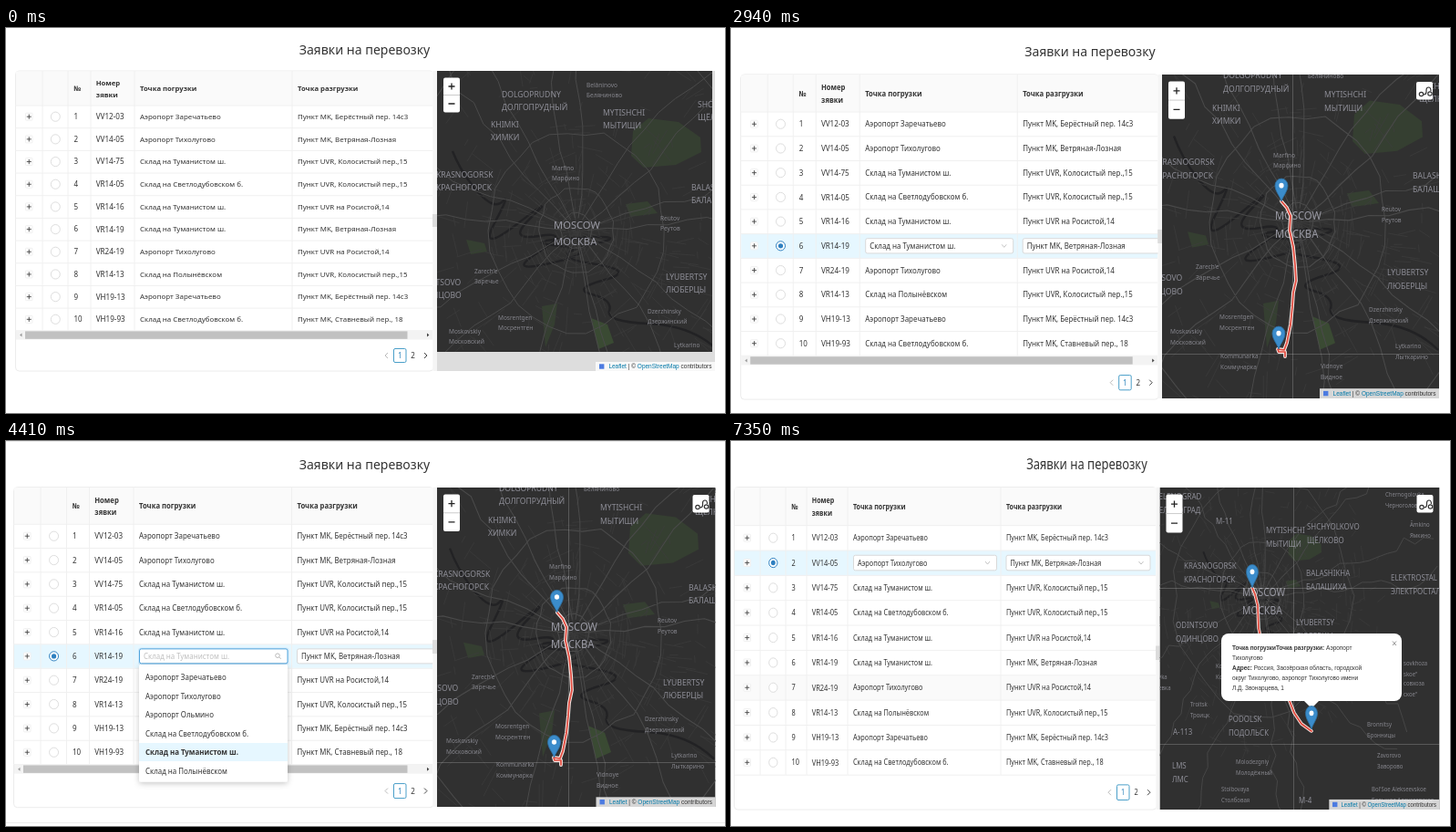
Animation of 789x422 px, one loop 8000 ms. Source, as an HTML page:

```html
<!DOCTYPE html>
<html lang="ru">
<head>
<meta charset="utf-8">
<title>Заявки на перевозку</title>
<style>
html, body { margin: 0; width: 100%; height: 100%; overflow: hidden; background: #fff; }
#stage { position: relative; width: 789px; height: 422px; overflow: hidden; }
#reel { animation: cut 8s step-end infinite; }
#reel > svg { display: block; }
text { font-family: "Noto Sans", "Open Sans", sans-serif; white-space: pre; }
.arial { font-family: "Liberation Sans", Arial, sans-serif; }
@keyframes cut {
  0% { transform: translateY(0); }
  18.375% { transform: translateY(-422px); }
  36.75% { transform: translateY(-844px); }
  55.125% { transform: translateY(-1266px); }
  73.5% { transform: translateY(-1688px); }
  91.875% { transform: translateY(-2110px); }
}
</style>
</head>
<body>
<div id="stage"><div id="reel"></div></div>
<script>
const airports = ['Заречатьево', 'Тихолугово', 'Ольмино'].map(n => 'Аэропорт ' + n);
const depots = ['Светлодубовском б.', 'Туманистом ш.', 'Полынёвском'].map(n => 'Склад на ' + n);
const places = [...airports, ...depots];
const drops = ['Пункт MK, Берёстный пер. 14с3', 'Пункт MK, Ветряная-Лозная',
  'Пункт UVR, Колосистый пер.,15', 'Пункт UVR на Росистой,14', 'Пункт MK, Ставневый пер., 18'];
const orders = [
  ['VV12-03', 0, 0], ['VV14-05', 1, 1], ['VV14-75', 4, 2], ['VR14-05', 3, 2], ['VR14-16', 4, 3],
  ['VR14-19', 4, 1], ['VR24-19', 1, 3], ['VR14-13', 5, 2], ['VH19-13', 0, 0], ['VH19-93', 3, 4]];

// Place labels: x, y, Latin name, Cyrillic name
const cityLabels = [
  [637, 63, 'Belâninovo', 'Беляниново'], [544, 73, 'DOLGOPRUDNY', 'ДОЛГОПРУДНЫЙ'],
  [532, 106, 'KHIMKI', 'ХИМКИ'], [655, 93, 'MYTISHCHI', 'МЫТИЩИ'], [759, 84, 'SHCHYOLKOVO', 'ЩЁЛКОВО'],
  [599, 154, 'Marfino', 'Марфино'], [472, 161, 'KRASNOGORSK', 'КРАСНОГОРСК'],
  [752, 175, 'BALASHIKHA', 'БАЛАШИХА'], [718, 209, 'Reutov', 'Реутов'], [601, 216, 'MOSCOW', 'МОСКВА'],
  [514, 267, "Zarech'e", 'Заречье'], [449, 279, 'ODINTSOVO', 'ОДИНЦОВО'], [724, 273, 'LYUBERTSY', 'ЛЮБЕРЦЫ'],
  [540, 318, 'Mosrentgen', 'Мосрентген'], [704, 311, 'Dzerzhinsky', 'Дзержинский'],
  [486, 333, 'Moskovskiy', 'Московский'], [733, 348, 'Lytkarino', 'Лыткарино'],
  [541, 358, 'Kommunarka', 'Коммунарка'], [651, 368, 'Vidnoye', 'Видное'], [546, 15, 'Lobnya', 'Лобня'],
  [410, 24, 'ZELENOGRAD', 'ЗЕЛЕНОГРАД'], [703, 13, 'PUSHKINO', 'ПУШКИНО'], [415, 148, 'Nakhabino', 'Нахабино']];
const regionLabels = [
  [587, 98, 'MYTISHCHI', 'МЫТИЩИ'], [632, 94, 'SHCHYOLKOVO', 'ЩЁЛКОВО'], [497, 137, 'KRASNOGORSK', 'КРАСНОГОРСК'],
  [561, 166, 'MOSCOW', 'МОСКВА'], [631, 145, 'BALASHIKHA', 'БАЛАШИХА'], [724, 150, 'ELEKTROSTAL', 'ЭЛЕКТРОСТАЛЬ'],
  [620, 199, 'LYUBERTSY', 'ЛЮБЕРЦЫ'], [488, 202, 'ODINTSOVO', 'ОДИНЦОВО'], [718, 58, 'Chernogolovka', 'Черноголовка'],
  [745, 91, 'Âmkino', 'Ямкино'], [465, 61, 'ZELENOGRAD', 'ЗЕЛЕНОГРАД'], [532, 88, 'M-11', ''],
  [504, 288, 'Troitsk', 'Троицк'], [546, 305, 'PODOLSK', 'ПОДОЛЬСК'], [485, 319, 'A-113', ''],
  [698, 310, 'Bronnitsy', 'Бронницы'], [709, 344, 'Zavorovo', 'Заворово'], [484, 356, 'LMS', 'ЛМС'],
  [554, 351, 'Molodezgniy', 'Молодёжный'], [538, 381, 'Stolbovaya', 'Столбовая'], [623, 394, 'M-4', ''],
  [703, 381, "Bol'Soe Alekseevskoe", 'Большое Алексеевское'], [451, 258, 'Aprelevka', 'Апрелевка'],
  [532, 246, 'Kommunarka', 'Коммунарка'], [738, 243, 'sovkhoza', 'skoe"'], [738, 265, 'совхоза', 'ское"']];

const cols = [10.5, 40, 68, 93, 141, 314, 468];
const shift = d => cols.map(x => x + d);
// map: [left, top, right, bottom]; world: [x scale, x shift, y scale, y shift]
const scenes = [
  { ky: 1, ty: 0, cols, mid: 393.5, map: [473, 47, 778, 376], tiles: [775, 355], world: [1, 0, 1, 0] },
  { ky: 1.092, ty: -.9, cols: shift(.4), mid: 394, map: [473, 51, 777, 408.5], world: [1, 39.5, 1.092, 49],
    row: 0, from: 0, pins: [[571.5, 93], [678, 283]],
    route: '572 93 569 96 560 99 552 103 548 108 550 113 556 117 565 114 574 114 580 117 585 127 592 150 598 158 604 170 602 177 606 183 616 192 624 200 632 208 640 220 642 235 645 250 650 257 652 263 658 262 661 271 672 273 678 283' },
  { ky: 1.0827, ty: 0, cols: shift(.2), mid: 394, map: [473, 51, 777, 406], world: [1, -4, 1.08, -27.3],
    row: 5, from: 4, pins: [[604, 190], [601, 352]], seams: 'M616.5 51V406M473 357.5H777',
    route: '604 190 610 197 614 206 613 222 617 240 619 260 620 277 617 290 616 305 614 325 610 345 607 353 600 352 601 355 608 355 608 360' },
  { ky: 1.067, ty: .5, cols: [8.5, 38, 66.5, 91.5, 140, 313.5, 468], mid: 393.5, map: [473, 51, 778.5, 401],
    world: [1, -3, 1.064, -26], row: 5, from: 4, open: true, pins: [[604.5, 188], [601.5, 347]],
    seams: 'M617.5 51V401M473 352.5H779',
    route: '605 188 611 195 615 204 614 219 618 237 620 256 621 273 618 287 617 301 615 320 611 340 608 348 601 347 602 350 609 350 609 355' },
  { ky: 1.09, ty: -.2, cols: shift(2), mid: 396, map: [475, 51.5, 779, 408], world: [4, -1786, 4.4, -719], blur: true,
    row: 5, from: 5, pins: [[643, 176], [551, 290]], seams: 'M693.5 51V408M475 170.5H779',
    route: '646 174 643 178 640 171 637 176 631 182 624 182 619 186 612 190 603 194 598 192 588 192 585 200 579 212 566 208 555 208 552 215 549 235 545 252 545 262 547 275 549 288 550 292' },
  { kx: .925, ky: 1.108, ty: -1.5, cols: [3.5, 32, 60, 83, 128, 296, 466], mid: 390.5, map: [470.5, 51, 777.5, 404],
    world: [.475, 285.6, .555, 46.5], row: 1, from: 1, hover: 6, noScroll: true, popup: true,
    pins: [[572, 161], [637, 316]], seams: 'M617.5 51V404M470 161.5H778M470 332.5H778',
    route: '572 161 575 168 578 180 579 205 584 230 597 255 611 280 618 298 626 310 637 318' }];

const rect = (l, t, r, b, fill, more = '') =>
  `<rect x="${l}" y="${t}" width="${r - l}" height="${b - t}" fill="${fill}" ${more}/>`;
const line = (d, color, w = 1, more = '') => `<path d="${d}" fill="none" stroke="${color}" stroke-width="${w}" ${more}/>`;

// Street network: wobbly rings and radial roads plus short random streets
function network() {
  let seed = 77;
  const rnd = () => (seed = seed * 16807 % 2147483647) / 2147483647;
  const polar = (a, r) => `${(626 + Math.cos(a) * r).toFixed(1)} ${(222 + Math.sin(a) * r * 1.15).toFixed(1)}`;
  let major = '', minor = '';
  for (const r of [17, 41, 95, 205]) {
    const pts = [];
    for (let i = 0; i < 30; i++) pts.push(polar(i * Math.PI / 15, r * (.96 + rnd() * .08)));
    major += `M${pts.join('L')}Z`;
  }
  for (let k = 0; k < 17; k++) {
    let a = k * Math.PI * 2 / 17 + rnd() * .2;
    const pts = [];
    for (let r = 12; r < 420; r += 22) pts.push(polar(a += (rnd() - .5) * .11, r));
    major += `M${pts.join('L')}`;
  }
  for (let i = 0; i < 620; i++) {
    const a = rnd() * 7, r = 4 + 270 * Math.pow(rnd(), 1.15), len = 6 + rnd() * 24;
    const end = rnd() < .5 ? [a + (rnd() - .5) * .1, r + len] : [a + len / r, r + (rnd() - .5) * 8];
    minor += `M${polar(a, r)}L${polar(...end)}`;
  }
  return { major, minor };
}
const streets = network();
const river = 'M490 135Q500 160 518 180T545 190T536 214T562 214T577 207T585 228T584 246T601 257T608 239T626 230T641 238T642 258T657 276T643 292T662 310T705 324T780 352';
const woods = 'M688 113L705 99L738 103L762 120L763 136L735 150L700 153L686 140ZM680 193L704 190L715 203L685 207ZM588 305L605 302L602 325L592 350ZM505 232L525 236L528 245L510 248Z';

function build(s) {
  const { kx = 1, ky, cols: c } = s, Y = y => y * ky + s.ty, [L, R] = [c[0], c[6]];
  const text = (x, y, str, size, more = '', mx = kx, my = ky) =>
    `<text transform="translate(${x} ${y + size * .36 * my}) scale(${mx} ${my})" font-size="${size}" fill="#333" ${more}>${str}</text>`;
  const cut = s.noScroll ? 10 : 0;
  const radio = (x, y, on) => `<ellipse cx="${x}" cy="${y}" rx="${5 * kx}" ry="5.1" fill="#fff" stroke="${on ? '#2f80c0' : '#dedede'}"/>`
    + (on ? `<ellipse cx="${x}" cy="${y}" rx="${2.6 * kx}" ry="2.7" fill="#2f80c0"/>` : '');
  const chevron = (x, y) => line(`M${x - 2.5} ${y - 1.5}l2.5 3 2.5-3`, '#bbb', .9);

  function picker(l, r, y, str, open) {
    const h = 7.5 * ky;
    return (open ? rect(l - 1.5, y - h - 1.5, r + 1.5, y + h + 1.5, '#cfe8fa', 'rx="3"') : '')
      + rect(l, y - h, r, y + h, '#fff', `rx="2" stroke="${open ? '#51a4dc' : '#d9d9d9'}"`)
      + text(l + 4.5, y, str, 7.9, open ? 'style="fill:#bfbfbf"' : '')
      + (open ? `<circle cx="${r - 11}" cy="${y - .7}" r="2.3" fill="none" stroke="#bbb"/>` + line(`M${r - 9.3} ${y + 1}l2 2`, '#bbb')
        : chevron(r - 10, y));
  }

  function table() {
    const head = (x, y, str) => text(x, Y(y), str, 7.7, 'font-weight="600"');
    const bodyEnd = Y(85 + 246.8), bottom = Y(376 - cut);
    let out = rect(L, Y(47), R + 1, bottom, '#fff', 'rx="4" stroke="#ececec"') + rect(L + .5, Y(47.5), R, Y(85), '#fafafa');
    let rows = '';
    orders.forEach(([id, a, b], i) => {
      const y = Y(97.2 + 24.68 * i), top = Y(85 + 24.68 * i), end = Y(85 + 24.68 * (i + 1));
      const on = i === s.row, px = (L + c[1]) / 2;
      if (on || i === s.hover) out += rect(L + .5, top, R, end, on ? '#e6f7ff' : '#fafafa');
      rows += line(`M${L} ${end}H${R}`, '#f0f0f0')
        + rect(px - 3.8, y - 4, px + 3.8, y + 4, '#fff', 'rx="1" stroke="#f0f0f0"')
        + line(`M${px - 2.5} ${y}h5M${px} ${y - 2.6}v5.2`, '#444', .9)
        + radio((c[1] + c[2]) / 2 + .3, y, on)
        + text(c[2] + 6.5, y, i + 1, 8) + text(c[3] + 5.7, y, id, 8.1);
      rows += on
        ? picker(c[4] + 6.5, c[5] - 4.5, y, places[s.from], s.open) + picker(c[5] + 6, s.noScroll ? R - 6 : R + 20, y, drops[b])
        : text(c[4] + 6, y, places[a], 7.9) + text(c[5] + 6, y, drops[b], 7.9);
    });
    out += line(c.slice(1, 6).map(x => `M${x} ${Y(47)}V${bodyEnd}`).join('') + `M${L} ${Y(85)}H${R}`, '#f0f0f0') + rows;
    out += head(c[2] + 6.5, 66.3, '№') + head(c[3] + 5.7, 60.3, 'Номер') + head(c[3] + 5.7, 73, 'зявки')
      + head(c[4] + 6, 66.3, 'Точка погрузки') + head(c[5] + 6, 66.3, 'Точка разгрузки');
    if (!s.noScroll) {
      const y = Y(336.6);
      out += rect(L + .5, y - 5, R, y + 5, '#f3f3f3') + rect(L + 10.5, y - 4.2, R - 27.5, y + 4.2, '#c1c1c1')
        + `<path d="M${L + 7} ${y - 2}v4l-2.4-2z" fill="#999"/><path d="M${R - 6} ${y - 2}v4l2.4-2z" fill="#444"/>`;
    }
    const py = Y(359 - cut);
    return out + line(`M${R - 49} ${py - 3}l-3 3 3 3`, '#bbb') + line(`M${R - 9} ${py - 3}l3 3-3 3`, '#444')
      + rect(R - 42.5, py - 7.5 * ky, R - 29, py + 7.5 * ky, '#fff', 'rx="1.5" stroke="#4a9fc9"')
      + text(R - 35.8, py, '1', 8, 'text-anchor="middle" style="fill:#2f86bd"')
      + text(R - 21.5, py, '2', 8, 'text-anchor="middle"');
  }

  function labels() {
    const [ax, bx, ay, by] = s.popup ? [1, 0, 1, 0] : s.world;
    const mx = s.blur ? ax : kx, my = s.blur ? ay : ky;
    return (s.popup ? regionLabels : cityLabels).map(([x, y, latin, local]) => {
      const caps = latin === latin.toUpperCase();
      const [size, gap, color] = latin === 'MOSCOW' ? [11.2, 17.8, '#9a9aa4'] : caps ? [8.6, 13.5, '#8d8d96'] : [6.5, 11, '#85858c'];
      const style = `style="fill:${color}"`, sx = x * ax + bx, sy = y * ay + by;
      return text(sx, sy, latin, size, style, mx, my) + text(sx, sy + gap * my, local, size, style, mx, my);
    }).join('');
  }

  function controls([l, t, r, b]) {
    const zx = l + 7, zy = t + 7.5, h = 19 * ky, mx = zx + 9;
    let out = rect(zx, zy, zx + 18, zy + 2 * h, '#fff', 'rx="2"') + line(`M${zx} ${zy + h}h18`, '#ccc')
      + line(`M${mx - 3.5} ${zy + h / 2}h7m-3.5-3.6v7.2M${mx - 3.5} ${zy + h * 1.5}h7`, '#222', 1.3);
    if (s.pins) {
      const x = r - 25, y = t + 8;
      out += rect(x, y, x + 18, y + 19.5, '#fff', 'rx="2"')
        + `<g fill="none" stroke="#333" stroke-width="1.2"><circle cx="${x + 5.5}" cy="${y + 13.5}" r="2.2"/><circle cx="${x + 15}" cy="${y + 13}" r="2.2"/>`
        + `<path d="M${x + 8} ${y + 14}q3 0 3-3v-2q0-3 2.5-3t2.5 4"/></g>`;
    }
    const ay = b - 5 * ky;
    return out + rect(r - 131 * kx, b - 10 * ky, r, b, '#fff', 'fill-opacity=".8"')
      + rect(r - 127 * kx, ay - 2.7, r - 127 * kx + 5.4, ay + 2.7, '#4c7be1')
      + text(r - 3.5, ay, '<tspan fill="#0078a8">Leaflet</tspan> | © <tspan fill="#0078a8">OpenStreetMap</tspan> contributors', 6.5, 'class="arial" text-anchor="end"');
  }

  function popup() {
    const rows = ['<tspan font-weight="700">Точка погрузкиТочка разгрузки:</tspan> Аэропорт', 'Тихолугово',
      '<tspan font-weight="700">Адрес:</tspan> Россия, Заозёрская область, городской',
      'округ Тихолугово, аэропорт Тихолугово имени', 'Л.Д. Звонарцева, 1'];
    return rect(538, 211, 736, 285, '#fff', 'rx="8"') + '<path d="M628 284h18l-9 9z" fill="#fff"/>'
      + rows.map((str, i) => text(550, 226 + 11.1 * i, str, 7, 'class="arial"')).join('')
      + line('M726 219.5l4 4.5m0-4.5l-4 4.5', '#888', .9);
  }

  function map() {
    const [l, t, r, b] = s.map, [tr, tb] = s.tiles || [r, b], [ax, bx, ay, by] = s.world;
    const w = ax < 1 ? 1.7 : s.blur ? 1.45 : 1;
    const view = (x, y) => `<svg x="${l}" y="${t}" width="${x - l}" height="${y - t}" viewBox="${l} ${t} ${x - l} ${y - t}">`;
    const pin = ([x, y]) => `<g transform="translate(${x} ${y}) scale(${kx} ${ky})"><path d="M0 0C-2-6-7-10-7-16A7 7 0 0 1 7-16C7-10 2-6 0 0Z" fill="#3b8ccb" stroke="#2d6f9f" stroke-width=".8"/><circle cy="-16" r="2.6" fill="#fff"/></g>`;
    let out = rect(l, t, r, b, '#ddd') + view(tr, tb) + rect(l, t, tr, tb, '#303030')
      + `<g ${s.blur ? 'filter="url(#soft)"' : ''}><g transform="matrix(${ax} 0 0 ${ay} ${bx} ${by})">`
      + `<path d="${woods}" fill="#353f31"/><path d="M642 318L660 325L667 345L650 352Z" fill="#3a4a33"/>`
      + line(river, '#222224', 2.4 * w) + line(streets.minor, '#3d3d3d', .7 * w) + line(streets.major, '#4a4a4a', w)
      + `</g>${labels()}</g>`;
    if (s.seams) out += line(s.seams, '#fff', 1, `stroke-opacity="${s.blur ? .35 : .2}"`);
    if (s.route) {
      const d = 'M' + s.route, join = 'stroke-linejoin="round" stroke-linecap="round"';
      out += line(d, '#f5e6e2', 3.8 * kx, join) + line(d, '#e0483c', 1.7, join);
    }
    if (s.popup) out += popup();
    if (s.pins) out += s.pins.map(pin).join('');
    return out + '</svg>' + view(r, b) + controls(s.map) + '</svg>';
  }

  function dropdown() {
    const l = c[4] + 6, r = c[5] - 4.5;
    return rect(l, 245, r, 373.5, '#fff', 'rx="2" filter="url(#shade)"') + rect(l, 331, r, 351, '#e6f7ff')
      + places.map((str, i) => text(l + 7, 259.3 + 20.5 * i, str, 7.9, i === s.from ? 'font-weight="600"' : '')).join('');
  }

  const gap = s.map[0];
  return `<svg width="789" height="422" viewBox="0 0 789 422">
    <defs><filter id="soft"><feGaussianBlur stdDeviation=".9"/></filter>
    <filter id="shade"><feDropShadow dx="0" dy="2" stdDeviation="3" flood-opacity=".22"/></filter></defs>`
    + rect(0, 0, 789, 422, '#fff')
    + (s.open ? line('M0 .5H789M0 418.5H789', '#ececec') : '')
    + text(s.mid, Y(24), 'Заявки на перевозку', 14, 'font-weight="500" text-anchor="middle"')
    + table() + rect(R + .5, Y(47) - 1, 789, Y(376) + 1, '#fff')
    + rect(R + .5, Y(47), gap, s.map[3], '#f5f5f5') + rect(R, Y(204), gap, Y(218), '#dcdcdc')
    + map() + (s.open ? dropdown() : '') + '</svg>';
}

document.getElementById('reel').innerHTML = scenes.map(build).join('');
</script>
</body>
</html>
```
